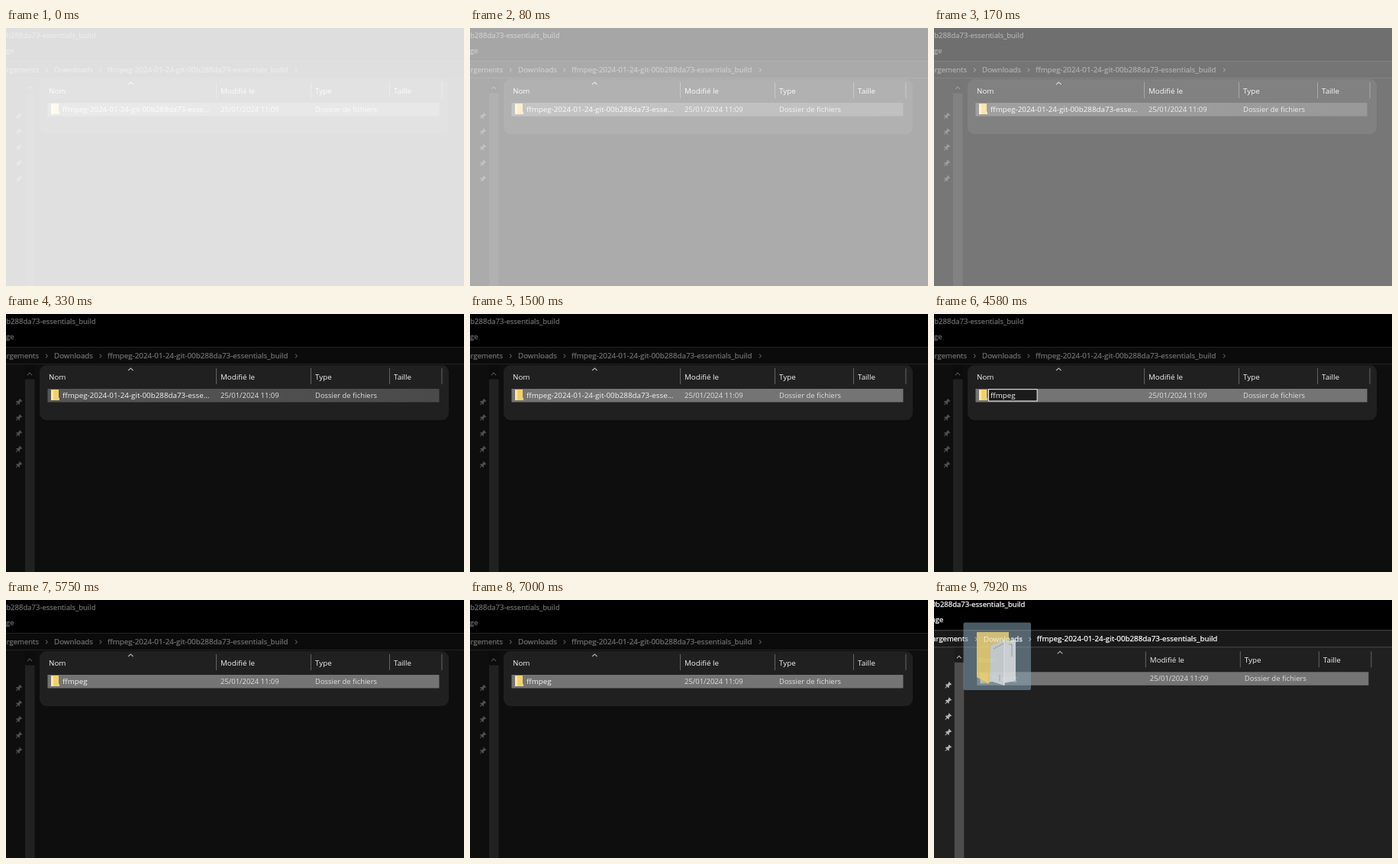
Recreate the animation shown at these times as an HTML page. Size 600x338 px, loop 8 s.

```html
<!DOCTYPE html>
<html lang="fr">
<head>
<meta charset="utf-8">
<title>Renommer un dossier</title>
<style>
  html, body { margin: 0; width: 100%; height: 100%; overflow: hidden; background: #000; }
  svg { display: block; width: 100vw; height: 100vh; }
  text { font-family: "Open Sans", "Noto Sans", sans-serif; font-size: 9.8px; fill: #f2f2f2; font-variant-ligatures: none; white-space: pre; }
  .bar text { fill: #fff; stroke: #fff; stroke-width: .25px; }
  .bar .end { text-anchor: end; font-size: 9.5px; }
  .cell { font-size: 9.45px; fill: #dedede; }
  .line { fill: none; stroke: #b0b0b0; stroke-width: 1.1; }
</style>
</head>
<body>
<svg viewBox="0 0 600 338" preserveAspectRatio="none">
  <defs>
    <path id="pin" d="M-2.4 -4.4H2.4V-3.3L1.6 -2.8V-.4L3 1V1.9H.5V5H-.5V1.9H-3V1L-1.6 -.4V-2.8L-2.4 -3.3Z"/>
    <path id="next" class="line" d="M0 -2.5l2.5 2.5l-2.5 2.5"/>
    <linearGradient id="hover">
      <stop offset="0" stop-color="#565656"/>
      <stop offset="1" stop-color="#4a4a4a"/>
    </linearGradient>
  </defs>

  <g id="scene">
    <rect x="-20" y="-20" width="640" height="64" fill="#000"/>
    <rect x="-20" y="44" width="640" height="22" fill="#191919"/>
    <rect x="-20" y="66" width="640" height="300" fill="#202020"/>
    <path d="M-20 43.5H620M-20 65.5H620" stroke="#505050"/>

    <g class="bar">
      <text class="end" x="117.5" y="13">ffmpeg-2024-01-24-git-00b288da73-essentials_build</text>
      <text class="end" x="10.5" y="33">Affichage</text>
      <text class="end" x="43" y="58.2">Téléchargements</text>
      <text x="63" y="58.2">Downloads</text>
      <text x="133" y="58.2">ffmpeg-2024-01-24-git-00b288da73-essentials_build</text>
    </g>
    <use href="#next" x="52" y="55"/>
    <use href="#next" x="122.5" y="55"/>
    <use id="last" href="#next" x="379" y="55"/>

    <rect x="25" y="66" width="12.5" height="20" fill="#1b1b1b"/>
    <rect x="25" y="85.5" width="12.5" height="280" fill="#4d4d4d"/>
    <path class="line" d="M28 80l3 -3l3 3"/>
    <g id="pins" fill="#b4b4b4"></g>

    <text x="56" y="85.6">Nom</text>
    <text x="281" y="85.6">Modifié le</text>
    <text x="405" y="85.6">Type</text>
    <text x="508" y="85.6">Taille</text>
    <path d="M275.5 71V92M399.5 71V92M502.5 71V92M571 71V92" stroke="#646464"/>
    <path class="line" d="M160 74l3.3 -3l3.3 3"/>

    <rect id="row" x="54.5" y="98" width="513" height="17.5"/>
    <path d="M59 99h10v10l1 1.5v2.5h-11z" fill="#f3d06f"/>
    <path d="M59 99l3 1.5v12.5h-3z" fill="#ffe9a3"/>
    <text id="name" x="74" y="109.9" fill="#fff"></text>
    <text class="cell" x="281" y="109.9">25/01/2024 11:09</text>
    <text class="cell" x="405" y="109.9">Dossier de fichiers</text>

    <g id="edit">
      <rect id="box" x="71.5" y="98.7" width="60" height="15.3" fill="#1b1b1b" stroke="#f4f4f4"/>
      <rect id="mark" x="73.5" y="100.3" width="0" height="12.2" fill="#0078d7"/>
      <text id="input" x="74" y="109.9"></text>
    </g>

    <path id="dim" fill-rule="evenodd" d="M-20 -20H620V366H-20ZM53 67H571a9 9 0 0 1 9 9V130a9 9 0 0 1 -9 9H53a9 9 0 0 1 -9 -9V76a9 9 0 0 1 9 -9Z"/>
  </g>

  <g id="drag">
    <rect x="38.5" y="29.5" width="88.5" height="88.5" rx="2" fill="#84a0b2" fill-opacity=".56"/>
    <g opacity=".86">
      <path d="M56 42H98V97L73 108L56 100Z" fill="#e3cc78"/>
      <path d="M90 56L107 52V106L91 109Z" fill="#dcdfe0"/>
      <path d="M74 60L92 52V112L73 106Z" fill="#d3d6d8"/>
      <path d="M78 64L91 57M98 58H102V74M86 98V106" fill="none" stroke="#9ca3a6"/>
      <path d="M92 52V112" stroke="#f0f2f2"/>
      <path d="M56 42L72 58V110L56 101Z" fill="#ebcf70"/>
    </g>
    <text x="65" y="54.5" opacity=".8">Downloads</text>
  </g>

  <rect id="flash" width="600" height="338" fill="#fff"/>
</svg>

<script>
  const $ = id => document.getElementById(id);
  const LOOP = 8000, STEP = 1000 / 12;
  const SELECT = 830, RENAME = 2580, DONE = 5420, DRAG = 7660;
  const LONG = "ffmpeg-2024-01-24-git-00b288da73-essentials_build";
  const CUT = LONG.replace(/ntials_build$/, "...");
  const SHORT = "ffmpeg";

  // [time, typed letters]
  const TYPING = [[2910, 0], [3160, 1], [3320, 2], [3490, 3], [3660, 4], [3830, 5], [4070, 6]];

  const clamp = v => Math.max(0, Math.min(1, v));
  const set = (id, key, value) => $(id).setAttribute(key, value);
  const show = (id, on) => set(id, "visibility", on ? "visible" : "hidden");

  $("pins").innerHTML = [0, 1, 2, 3, 4].map(i =>
    `<use href="#pin" transform="translate(16.5 ${115.5 + i * 20.6}) rotate(45)"/>`).join("");

  function typedAt(t) {
    let text = LONG;
    for (const [at, n] of TYPING) if (t >= at) text = SHORT.slice(0, n);
    return text;
  }

  function drawEdit(t) {
    const editing = t >= RENAME && t < DONE;
    show("edit", editing);
    if (!editing) return;
    const text = typedAt(t);
    $("input").textContent = text;
    const w = text ? $("input").getComputedTextLength() : 0;
    set("box", "width", w + 31);
    set("mark", "width", text === LONG ? w + 1 : 0);
  }

  function draw(t) {
    set("flash", "opacity", clamp(0.87 - t * 0.00262));

    set("row", "fill", t >= SELECT ? "#747474" : "url(#hover)");
    $("name").textContent = t < RENAME ? CUT : t < DONE ? "" : SHORT;
    drawEdit(t);

    const p = clamp((t - DRAG + STEP) / (4 * STEP));
    set("scene", "transform", `translate(${1.8 * p} ${-3.7 * p})`);
    set("dim", "opacity", 0.57 * (1 - p));

    show("drag", t >= DRAG);
    show("last", t < DRAG);
    set("drag", "opacity", 0.4 + 0.6 * p);
    set("drag", "transform", `translate(${4 * (1 - p)} ${5 * (1 - p)})`);
  }

  const start = performance.now();
  function tick(now) {
    const t = Math.max(0, now - start) % LOOP;
    draw(Math.floor(t / STEP + 0.05) * STEP);
    requestAnimationFrame(tick);
  }
  draw(0);
  requestAnimationFrame(tick);
</script>
</body>
</html>
```
